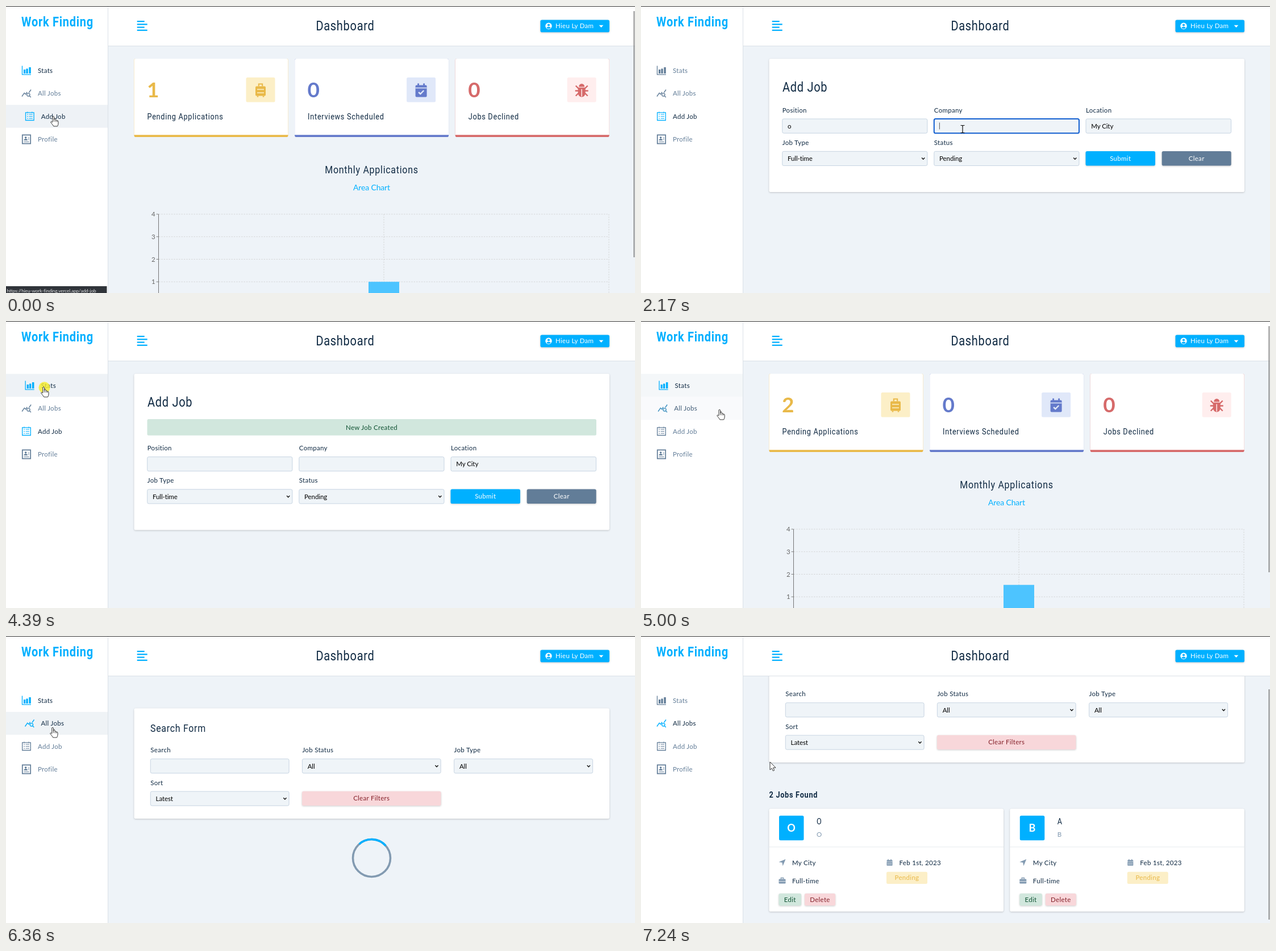
Write an HTML page that moves like this. It is 1107 px wide and 506 px high and loops after 7.31 s.

```html
<!DOCTYPE html>
<html lang="en">
<head>
<meta charset="utf-8">
<title>Job dashboard</title>
<style>
  html, body { margin: 0; width: 100%; height: 100%; overflow: hidden; background: #eef3f8; }
  svg { display: block; width: 1107px; height: 506px; }
  text { font: 11.5px Lato, "Open Sans", sans-serif; letter-spacing: .3px; fill: #102a43; white-space: pre; }
  .plain { letter-spacing: -.1px; fill: #000; }
  .head { font-family: Roboto, "Open Sans", sans-serif; letter-spacing: .83px; }
  .mid { text-anchor: middle; }
  .end { text-anchor: end; }
  .bold { font-weight: 700; }
  .shadow { filter: drop-shadow(0 1.5px 1.5px #0003); }
  .line { fill: none; }
</style>
</head>
<body>
<svg id="stage" viewBox="0 0 1107 506"></svg>
<script>
const LOOP = 7310;
const BLUE = '#00b0ff', DARK = '#102a43', GREY = '#627d98', PALE = '#829ab1';
const OPEN_ADD = 380, OPEN_STATS = 4450, OPEN_JOBS = 6355;
const SAVED = 3560, COUNTED = 4540, LOADED = 6640;

const clamp = v => Math.min(1, Math.max(0, v));
const smooth = v => (v = clamp(v), v * v * (3 - 2 * v));
const mix = (a, b, p) => '#' + [1, 3, 5].map(i => {
  const [u, v] = [a, b].map(c => parseInt(c.slice(i, i + 2), 16));
  return Math.round(u + (v - u) * p).toString(16).padStart(2, '0');
}).join('');
const within = (t, spans) => spans.some(([a, b]) => t >= a && t < b);

// The CSS "ease" curve, solved by bisection.
function ease(x) {
  x = clamp(x);
  let lo = 0, hi = 1;
  for (let i = 0; i < 20; i++) {
    const s = (lo + hi) / 2, r = 1 - s;
    if (.75 * r * r * s + .75 * r * s * s + s ** 3 < x) lo = s; else hi = s;
  }
  return .3 * lo * (1 - lo) ** 2 + 3 * lo * lo * (1 - lo) + lo ** 3;
}
const fade = (t, spans) => Math.max(...spans.map(([on, off]) =>
  ease((t - on) / 300) * (1 - ease((t - off) / 300))));

// Drawing helpers
const group = (x, y, body, attrs = '') => `<g transform="translate(${x} ${y})" ${attrs}>${body}</g>`;
const rect = (x, y, w, h, fill, attrs = '') => `<rect x="${x}" y="${y}" width="${w}" height="${h}" fill="${fill}" ${attrs}/>`;
const path = (d, stroke, width = 1, attrs = '') => `<path class="line" d="${d}" stroke="${stroke}" stroke-width="${width}" ${attrs}/>`;
const fillPath = (d, fill) => `<path d="${d}" fill="${fill}"/>`;
const circle = (x, y, r, fill) => `<circle cx="${x}" cy="${y}" r="${r}" fill="${fill}"/>`;
const text = (x, y, s, { fill, size, cls = '' } = {}) =>
  `<text x="${x}" y="${y}" class="${cls}" style="${fill ? `fill:${fill};` : ''}${size ? `font-size:${size}px` : ''}">${s}</text>`;
// Headings share one condensed face.
const heading = (x, y, s, size, { fill = DARK, cls = '' } = {}) =>
  group(x, y, `<g transform="scale(.87 1)">${text(0, 0, s, { fill, size, cls: 'head ' + cls })}</g>`);
const panel = (x, y, w, h, fill = '#fff') => rect(x, y, w, h, fill, 'rx="2.8" class="shadow"');
const button = (x, y, w, h, label, fill, ink) =>
  panel(x, y, w, h, fill) + text(x + w / 2, y + h / 2 + 4, label, { fill: ink, cls: 'mid' });

function field(x, y, w, label, value, { select, focus, caret } = {}) {
  return text(x, y - 11.5, label)
    + rect(x, y, w, 25.2, '#eff4f8', `rx="2.5" stroke="${focus ? '#125fd0' : '#bcccdc'}" stroke-width="${focus ? 2 : .8}"`)
    + text(x + 9.3, y + 16.8, value, { cls: 'plain' })
    + (caret ? path(`M${x + 9.6 + value.length * 7} ${y + 6.5}v12`, '#333', .8) : '')
    + (select ? path(`M${x + w - 9.8} ${y + 11.3}l2.6 2.7 2.6-2.7`, '#111', 1.4) : '');
}

// Sidebar icons, each centred on its own origin
const icons = {
  stats: c => path('M-7.5-8V7.3H8', c, 1.3)
    + rect(-5, -1.5, 3.3, 7, c) + rect(-.6, -3, 3.3, 8.5, c) + rect(4.3, -5.5, 3.5, 11, c),
  jobs: c => path('M-8 5.5L-3.8-.7-1.5 1.7 1-2.4M4.5-1.5L8-6.5', c, 1.4)
    + path('M6 2.3a2.7 2.7 0 1 0-5.4 0 2.7 2.7 0 1 0 5.4 0M5.2 4.2L7.8 7', c, 1.4),
  add: c => path('M-7.3-6.7H7.3V7H-7.3Z', c, 1.3)
    + path('M-4.8-3.5h2M-4.8 0h2M-4.8 3.5h2M-1.3-3.5H5M-1.3 0H5M-1.3 3.5H5', c, 1.2)
    + path('M-4-8v2M4-8v2', c, 1.2),
  profile: c => path('M-7.2-7.6H7.2V7.6H-7.2Z', c, 1.7) + circle(-1.3, -3, 1.8, c)
    + fillPath('M-4.5 2q0-2.8 3.2-2.8T1.9 2Z', c) + path('M-4.5 4.5h9M2.8-2.5h2M2.8 0h2', c, 1.2)
};
const links = [
  { label: 'Stats', icon: 'stats', active: [[-999, OPEN_ADD], [OPEN_STATS, OPEN_JOBS]], hover: [[4150, 4930]] },
  { label: 'All Jobs', icon: 'jobs', active: [[OPEN_JOBS, 9999]], hover: [[3560, 4150], [4930, 5040], [6140, 6590]] },
  { label: 'Add Job', icon: 'add', active: [[OPEN_ADD, OPEN_STATS]], hover: [[-999, 1110], [3430, 3560], [6590, 6735]] },
  { label: 'Profile', icon: 'profile', active: [[9998, 9999]], hover: [[9998, 9999]] }
];

function sidebar(t) {
  return rect(0, 0, 179, 506, '#fff') + rect(179, 0, 1, 506, '#dbe1e7')
    + heading(27, 35.5, 'Work Finding', 23, { fill: BLUE, cls: 'bold' })
    + links.map((link, i) => {
      const hover = fade(t, link.hover), on = Math.max(hover, fade(t, link.active));
      const y = 113.5 + i * 40.5, dx = 5.8 * hover;
      return rect(0, y - 20.2, 179, 40.5, mix('#ffffff', '#eef2f6', hover))
        + group(36 + dx, y, icons[link.icon](mix(GREY, BLUE, on)))
        + text(56 + dx, y + 4, link.label, { fill: mix(GREY, DARK, on) });
    }).join('');
}

function header() {
  const bars = [13, 18, 13, 18].map((w, i) => rect(230.7, 26 + i * 5.2, w, 2.3, BLUE)).join('');
  return rect(180, 0, 927, 70, '#fff') + rect(180, 70, 927, 1, '#dbe1e7') + bars
    + heading(597, 43, 'Dashboard', 23, { cls: 'mid' })
    + panel(940.5, 24.5, 121.5, 21.7, BLUE)
    + circle(955, 35.3, 5.7, '#fff') + circle(955, 33.5, 2.1, BLUE)
    + fillPath('M951.3 38.6q1-2.2 3.7-2.2t3.7 2.2q-1.5 1.5-3.7 1.5t-3.7-1.5Z', BLUE)
    + text(967, 39.3, 'Hieu Ly Dam', { fill: '#fff' })
    + fillPath('M1043.7 33.7h7.6l-3.8 4.2Z', '#fff');
}

const cardIcons = [
  (c, bg) => path('M-3.2-7v-4h6.4v4', c, 2) + rect(-9, -7, 18, 17, c, 'rx="2"')
    + path('M-6-1.5H6M-6 4.5H6', bg, 1.6) + path('M-5 10v2M5 10v2', c, 2.5),
  (c, bg) => rect(-10, -9, 20, 21, c, 'rx="2"') + path('M-5-12v5M5-12v5', c, 2.8)
    + path('M-10-4H10', bg, 1.5) + path('M-4.5 3.5l3.2 3 6-6', bg, 2.4),
  (c, bg) => path('M-10.5-8l4.5 4.5H6L10.5-8M-11.5 1H11.5M-10.5 10l5-5M10.5 10l-5-5', c, 2.4)
    + fillPath('M-5-6a5 5.5 0 0 1 10 0ZM-6.5-4.5h13V5a6.5 7 0 0 1-13 0Z', c) + path('M0-2V11', bg, 1.5)
];
const statCards = [
  ['Pending Applications', '#e9b949', '#fcefc7'],
  ['Interviews Scheduled', '#647acb', '#e0e8f9'],
  ['Jobs Declined', '#d66a6a', '#ffeeee']
];

function statsPage(t) {
  const pending = t > OPEN_ADD && t >= COUNTED ? 2 : 1;
  const level = t < OPEN_STATS ? 1 : 1 + ease((t - COUNTED) / 1500);
  const cards = statCards.map(([label, ink, tint], i) => group(225.5 + i * 282.6, 93,
    rect(0, 0, 271, 138, ink, 'rx="2.8"') + fillPath('M0 2.8Q0 0 2.8 0H268.2Q271 0 271 2.8V134.3H0Z', '#fff')
    + text(22.5, 68, i ? 0 : pending, { fill: ink, size: 37, cls: 'bold' })
    + rect(197, 33, 51, 43.5, tint, 'rx="2.5"') + group(222.5, 55.5, cardIcons[i](ink, tint))
    + heading(23, 107, label, 14.6))).join('');
  const rows = [4, 3, 2, 1, 0].map(n => {
    const y = 526 - n * 39.75;
    return path(`M269 ${y}H1061`, n ? '#ccc' : '#666', .8, n ? 'stroke-dasharray="2.2"' : '')
      + path(`M264.5 ${y}h4`, '#666', .8) + text(263, y + 4, n, { fill: '#666', cls: 'end' });
  }).join('');
  const height = level * 39.75;
  return cards
    + heading(643.5, 295, 'Monthly Applications', 18.4, { cls: 'mid' })
    + text(643.5, 324.5, 'Area Chart', { fill: BLUE, size: 13.9, cls: 'plain mid' })
    + rows + path('M268.5 367V526', '#666', .9)
    + path('M665 367V526M1061 367V526', '#ccc', .8, 'stroke-dasharray="2.2"')
    + rect(638, 526 - height, 54, height, '#4dc4ff')
    + text(665, 542, 'Feb 2023', { fill: '#666', cls: 'mid' });
}

function addPage(t) {
  const saved = t >= SAVED, dy = saved ? 40.5 : 0;
  const typed = start => t >= start && !saved ? 'o' : '';
  const blink = t % 1000 < 600;
  const first = within(t, [[1420, 2080]]), second = within(t, [[2080, 2750]]);
  const press = fade(t, [[2500, 3060]]);
  return panel(225.5, 93, 836.5, 235 + dy)
    + heading(249, 150.5, 'Add Job', 23)
    + (saved ? rect(248.5, 173, 790.5, 28.8, '#d1e7dd', 'rx="2.5"')
      + text(643.5, 191.5, 'New Job Created', { fill: '#0f5132', cls: 'mid' }) : '')
    + group(0, dy,
      field(248.7, 199, 255.2, 'Position', typed(1600), { focus: first, caret: first && blink })
      + field(515.8, 199, 255.2, 'Company', typed(2280), { focus: second, caret: second && blink })
      + field(783, 199, 255.6, 'Location', 'My City')
      + field(248.7, 256.3, 255.2, 'Job Type', 'Full-time', { select: true })
      + field(515.8, 256.3, 255.2, 'Status', 'Pending', { select: true })
      + button(782.5, 256, 122.5, 25.5, 'Submit', mix(BLUE, '#0085c8', press), '#fff')
      + button(916.7, 256, 122, 25.5, 'Clear', GREY, '#fff'));
}

function jobCard(x, company, position) {
  const calendar = rect(-5, -4.5, 10, 10, PALE, 'rx="1"') + path('M-2.5-6v3M2.5-6v3', PALE, 1.5)
    + path('M-5-1.8H5M-3.5 1h7M-3.5 3.5h7', '#fff', .9, 'stroke-dasharray="1.6 1"');
  const briefcase = rect(-6, -3, 12, 8, PALE, 'rx="1.3"') + path('M-2.2-3v-2h4.4v2', PALE, 1.3)
    + path('M-6 1.2H6', '#fff', .8);
  return group(x, 403.5, panel(0, 0, 412.5, 181.2) + rect(0, 67, 412.5, .9, '#e3e8ed')
    + rect(17.5, 12.3, 43.5, 43.5, BLUE, 'rx="2.5"')
    + text(39.2, 40.5, company, { fill: '#fff', size: 18, cls: 'mid bold' })
    + heading(83.5, 27.5, position, 14.6) + text(83.5, 49, company, { fill: PALE })
    + group(23, 95, fillPath('M6-6L1 6 0 0-6-1Z', PALE)) + text(40.5, 99, 'My City')
    + group(23, 127, briefcase) + text(40.5, 131, 'Full-time')
    + group(212, 95, calendar) + text(229, 99, 'Feb 1st, 2023')
    + rect(206.5, 111.3, 72, 21.3, '#fcefc7', 'rx="2.5"')
    + text(242.5, 125.5, 'Pending', { fill: '#e9b949', cls: 'mid' })
    + button(17, 149.5, 39.5, 21.3, 'Edit', '#d1e7dd', '#0f5132')
    + button(62.5, 149.5, 54, 21.3, 'Delete', '#f8d7da', '#842029'));
}

function jobsPage(t) {
  const spin = (t - OPEN_JOBS) * .6;
  const spinner = group(643.5, 391.5, '<circle class="line" r="33" stroke="#829ab1" stroke-width="3.6"/>'
    + path('M-23.3-23.3A33 33 0 0 1 23.3-23.3', BLUE, 3.6, `transform="rotate(${spin})"`));
  return panel(225.5, 127.5, 836.5, 194.5)
    + heading(254, 169, 'Search Form', 18.3)
    + field(254.3, 216.7, 243.8, 'Search', '')
    + field(521.4, 216.7, 243.8, 'Job Status', 'All', { select: true })
    + field(788.6, 216.7, 244, 'Job Type', 'All', { select: true })
    + field(254.3, 274, 243.8, 'Sort', 'Latest', { select: true })
    + button(521, 273.7, 244.5, 25.4, 'Clear Filters', '#f8d7da', '#842029')
    + (t < LOADED ? spinner : heading(225.5, 384, '2 Jobs Found', 14.6, { cls: 'bold' })
      + jobCard(225.5, 'O', 'O') + jobCard(649.3, 'B', 'A'));
}

// Pointer: time, x, y of each resting place
const route = [
  [0, 83, 194], [940, 83, 194], [1370, 350, 217], [1760, 350, 217], [2060, 566, 217], [2300, 566, 217],
  [2620, 843, 273], [2900, 843, 273], [3488, 110, 210], [3640, 90, 160], [4050, 90, 160], [4250, 66, 116],
  [4860, 66, 116], [5496, 640, 434], [5800, 640, 434], [6200, 82, 161], [6480, 82, 161], [6900, 227, 222], [LOOP, 227, 222]
];
const clicks = [[240, 340], [1400, 1490], [2070, 2160], [2740, 2840], [4330, 4440], [6230, 6330]];

function pointer(t, page) {
  const i = route.findIndex(p => p[0] > t), [t0, x0, y0] = route[i - 1], [t1, x1, y1] = route[i];
  const p = smooth((t - t0) / (t1 - t0)), x = x0 + (x1 - x0) * p, y = y0 + (y1 - y0) * p;
  const form = page === addPage && t < SAVED;
  const overLink = x < 179 && y > 93 && y < 255 || form && x > 783 && x < 905 && y > 256 && y < 282;
  const overInput = form && y > 199 && y < 224 && (x > 249 && x < 504 || x > 516 && x < 771 || x > 783 && x < 1038);
  const outline = 'stroke="#222" stroke-width=".9" stroke-linejoin="round" fill="#fff"';
  const shape = overLink
    ? `<path ${outline} d="M-1.2 1Q0-.8 1.4 1V7Q3-.0 4.2 7.3 5.8 6 6.7 8.2 8.8 7.4 9 10V13Q9 15.5 7.5 18H.8Q-1 15-4.2 11.2-4.5 8.8-1.2 11Z"/>`
      + path('M1.4 6.5V10M4.2 7.3V10.3M6.7 8.2V10.5', '#222', .8)
    : overInput ? path('M-3.5-6.5h2.5l1 1 1-1H3.5M0-5.5V5.5M-3.5 6.5h2.5l1-1 1 1H3.5', '#111', 1.2)
      : `<path ${outline} d="M0 0V14L3.2 11.2 5.4 15.8 7.7 14.8 5.6 10.2H10Z"/>`;
  return group(x, y, (within(t, clicks) ? circle(1.5, 1.2, 10, '#f8ee2ccc') : '') + shape);
}

function scrollbar(scroll, page, t) {
  if (page === addPage || page === jobsPage && t < LOADED) return '';
  const [length, ratio] = page === statsPage ? [434, 57 / 66] : [406, 85 / 99];
  return rect(1104.6, 9 + scroll * ratio, 1.6, length, '#7d7d7d');
}

const stage = document.getElementById('stage');
function draw(t) {
  const page = t >= OPEN_JOBS ? jobsPage : t >= OPEN_ADD && t < OPEN_STATS ? addPage : statsPage;
  const scroll = page === jobsPage ? 99 * (1 - (1 - clamp((t - 6780) / 370)) ** 3)
    : page === statsPage ? 66 * smooth((t - 5450) / 270) : 0;
  const status = t < 700 ? rect(0, 494, 177.5, 12, '#30343a')
    + text(1.5, 505, 'https://hieu-work-finding.vercel.app/add-job', { fill: '#e4e6e8', size: 8.3, cls: 'plain' }) : '';
  stage.innerHTML = rect(0, 0, 1107, 506, '#eef3f8') + group(0, -scroll, page(t))
    + header() + sidebar(t) + rect(0, 0, 1107, 1, '#333') + scrollbar(scroll, page, t)
    + status + pointer(t, page);
}

const start = performance.now();
function tick() {
  draw((performance.now() - start) % LOOP);
  requestAnimationFrame(tick);
}
tick();
</script>
</body>
</html>
```
